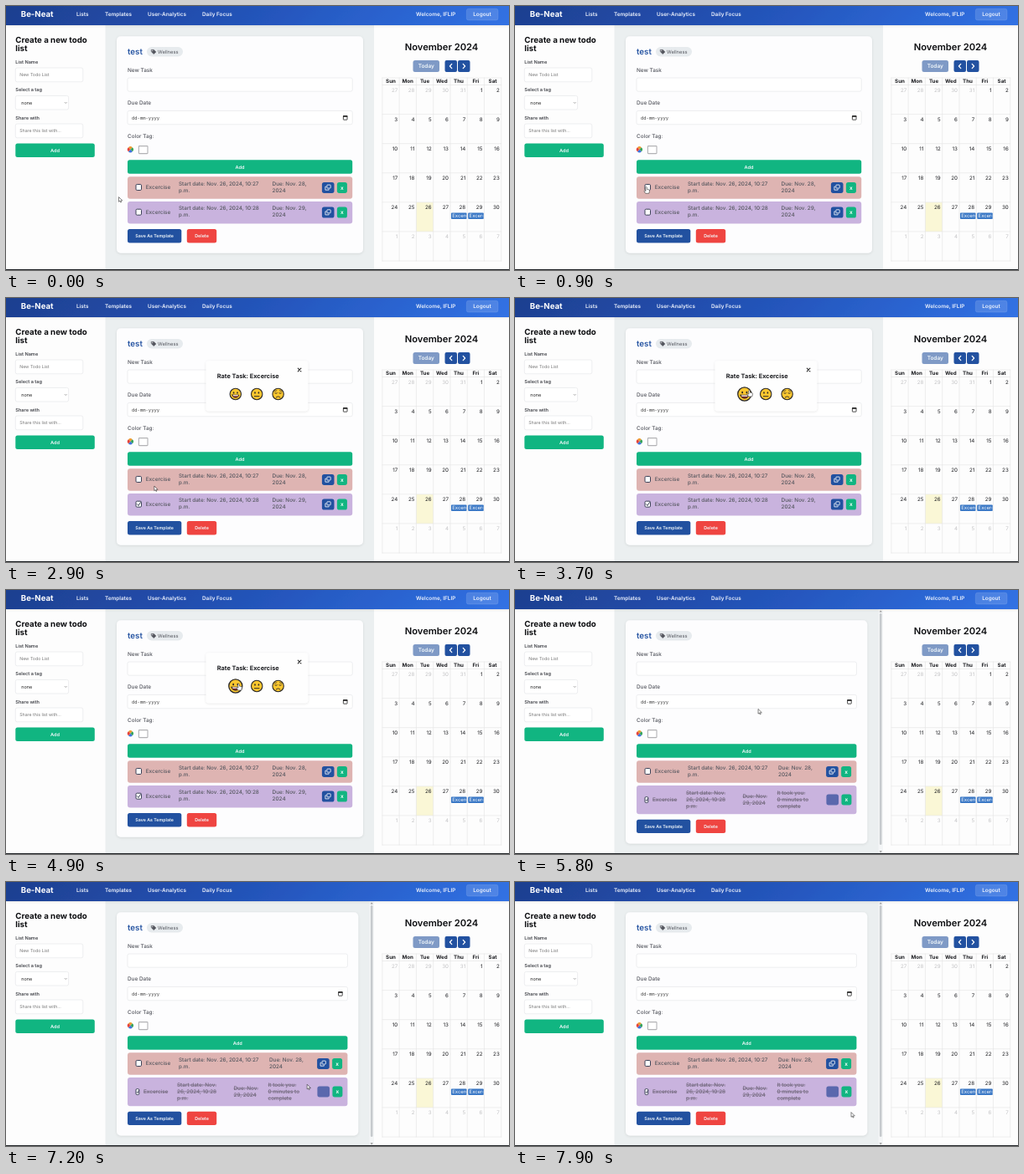
Animation, 600 px wide and 316 px high, one loop 8 s. Source, as an HTML page:

```html
<!DOCTYPE html>
<html lang="en">
<head>
<meta charset="utf-8">
<title>Todo list</title>
<style>
html, body { margin: 0; width: 100%; height: 100%; overflow: hidden; background: #fff; }
svg { display: block; width: 600px; height: 316px; }
text { font-family: Inter, sans-serif; text-rendering: geometricPrecision; white-space: pre; }
</style>
</head>
<body>
<svg id="stage" viewBox="0 0 600 316"></svg>
<script>
const LOOP = 8000, CHECKED = 2500, DONE = 5600;
const BLUE = '#2251a0', GREEN = '#11b581', GREY = '#54565e', LINE = '#e5e7ea';

const rect = (x, y, w, h, fill, r = 0, more = '') =>
  `<rect x="${x}" y="${y}" width="${w}" height="${h}" rx="${r}" fill="${fill}" ${more}/>`;
const path = (d, stroke, width = 1, fill = 'none') =>
  `<path d="${d}" stroke="${stroke}" stroke-width="${width}" fill="${fill}" stroke-linecap="round" stroke-linejoin="round"/>`;
const text = (s, x, y, size, weight = 400, fill = GREY, more = '') =>
  `<text x="${x}" y="${y}" font-size="${size}" font-weight="${weight}" fill="${fill}" ${more}>${s}</text>`;
const mid = 'text-anchor="middle"';
const lines = (list, x, y, more) =>
  list.map((s, i) => text(s, x, y + i * 7.9, 6.35, 500, more ? '#6f6679' : GREY, more)).join('');
const field = (x, y, w, h) => rect(x, y, w, h, '#fff', 2, `stroke="${LINE}" stroke-width=".7"`);
const button = (s, x, y, w, h, fill, size = 5.6) =>
  rect(x, y, w, h, fill, 2.5) + text(s, x + w / 2, y + h / 2 + size * .36, size, 600, '#f2f8fb', mid);

function header() {
  const links = [['Lists', 84], ['Templates', 118], ['User-Analytics', 169], ['Daily Focus', 234], ['Welcome, IFLIP', 489]];
  return rect(0, 0, 600, 23, 'url(#bar)', 0, 'filter="url(#soft)"') +
    text('Be-Neat', 17.8, 13.2, 9.6, 700, '#fff') +
    links.map(([s, x]) => text(s, x, 12.3, 6.4, 600, '#eef3fd')).join('') +
    rect(549.3, 3.2, 37.7, 13.8, '#fff', 2.5, 'fill-opacity=".14" stroke="#fff" stroke-opacity=".22" stroke-width=".5"') +
    text('Logout', 568, 12.3, 6.4, 600, '#eef3fd', mid);
}

function sidebar() {
  const label = (s, y) => text(s, 11.3, y, 5.6, 600, '#44464c');
  return rect(0, 23, 118.5, 293, '#fdfdfd') +
    text('Create a new todo', 11.3, 43.6, 9.7, 700, '#0d0e11') +
    text('list', 11.3, 54.4, 9.7, 700, '#0d0e11') +
    label('List Name', 69) + field(11.3, 74, 80.5, 16.8) +
    text('New Todo List', 16.2, 84.3, 5.25, 400, '#777') +
    label('Select a tag', 102.4) + field(11.3, 107.4, 63.3, 16.6) +
    text('none', 18.2, 117.7, 5.5, 400, '#222') + path('M70 115.3l1.2 1.2 1.2-1.2', '#777', .6) +
    label('Share with', 136) + field(11.3, 141, 80.5, 16.8) +
    text('Share this list with...', 16.2, 151.3, 5.25, 400, '#777') +
    button('Add', 11.3, 164.5, 94.5, 16.5, GREEN);
}

function calendar() {
  const col = i => 448.9 + i * 20.26, row = i => 94.5 + i * 35.1;
  let s = rect(439, 23, 161, 293, '#fdfdfd') +
    text('November 2024', 519.5, 52.6, 11.2, 600, '#0d0e11', mid) +
    button('Today', 485.5, 65, 31.5, 14, '#7f9ac6', 6.5) +
    rect(523.5, 65, 14.5, 14, BLUE, 2) + rect(539, 65, 14.5, 14, BLUE, 2) +
    path('M531.8 69.4l-2.4 2.6 2.4 2.6M545.2 69.4l2.4 2.6-2.4 2.6', '#fff', 1.2) +
    rect(col(2), row(4), 20.26, 35.1, '#faf7d6');
  let grid = '';
  for (let i = 0; i < 8; i++) grid += `M${col(i)} 86V${row(6)}`;
  for (let i = 0; i < 7; i++) grid += `M${col(0)} ${row(i)}H${col(7)}`;
  s += path(grid + `M${col(0)} 86H${col(7)}`, '#e3e3e3', .6);
  'Sun Mon Tue Wed Thu Fri Sat'.split(' ').forEach((d, i) => {
    s += text(d, col(i) + 10.1, 92.2, 6.2, 700, '#1a1b1f', mid);
  });
  for (let i = 0; i < 42; i++) {
    const day = new Date(2024, 9, 27 + i);
    s += text(day.getDate(), col(i % 7 + 1) - 2, row(i / 7 | 0) + 8.3, 6.2, 400,
      day.getMonth() === 10 ? '#1a1b1f' : '#c3c3c5', 'text-anchor="end"');
  }
  for (const c of [4, 5]) {
    s += rect(col(c) + 1, 247.5, 18.6, 7.5, '#3a78c6', 1) +
      `<svg x="${col(c) + 1}" y="246.6" width="18.2" height="9">${text('Excerc', 1.4, 6.6, 5.9, 400, '#fff')}</svg>`;
  }
  return s;
}

const checkbox = (x, y, w = 6.5) => rect(x, y, w, 7, '#fff', 1.3, 'stroke="#3c4258" stroke-width="1"');
const rowButtons = (x, y, faded) =>
  rect(x, y, 14.6, 13, faded ? '#5a68ad' : BLUE, 2.6) +
  (faded ? '' : rect(x + 6, y + 3.2, 4.3, 4, 'none', .6, 'stroke="#fff" stroke-width=".8"') +
    path(`M${x + 4.9} ${y + 5.3}h-.9v4h4.2v-.9`, '#fff', .8)) +
  rect(x + 18, y, 12, 13, GREEN, 2.6) + text('x', x + 24, y + 8.6, 6.4, 700, '#e9fff6', mid);

function openRow(y, fill, w, min, due, dueX) {
  return rect(145, y, w, 26.4, fill, 3) + checkbox(155, y + 9.2) +
    text('Excercise', 166.8, y + 14.6, 6.35, 500) +
    lines([`Start date: Nov. 26, 2024, 10:${min}`, 'p.m.'], 206, y + 10.3) +
    lines([`Due: Nov. ${due},`, '2024'], dueX, y + 10.3) +
    rowButtons(145 + w - 36.3, y + 6.6);
}

function doneRow(y, w) {
  const strike = 'text-decoration="line-through"';
  return rect(145, y, w, 34.2, '#c9b3de', 3) + checkbox(155, y + 13.6, 3.8) +
    path(`M156 ${y + 17.3}l1 1.3 1.5-3.2`, '#3c4258', .8) +
    lines(['Excercise'], 164, y + 19, strike) +
    lines(['Start date: Nov.', '26, 2024, 10:28', 'p.m.'], 204, y + 11, strike) +
    lines(['Due: Nov.', '29, 2024'], 271.5, y + 15, strike) +
    lines(['It took you:', '0 minutes to', 'complete'], 312.5, y + 11, strike) +
    rowButtons(145 + w - 36, y + 10.4, true);
}

function card(done) {
  const w = done ? 262.4 : 268.2, end = 145 + w, drop = done ? 7.7 : 0;
  const wheel = ['#ee9a2e', '#35a35a', '#3f73dd', '#e5433a'].map((c, i) =>
    `<path d="M0 0V-3.5A3.5 3.5 0 0 1 3.5 0Z" fill="${c}" transform="translate(148.4 171.8) rotate(${i * 90 - 45})"/>`).join('');
  return rect(132, 36.3, w + 25.8, 259.4 + drop, '#fdfdfe', 5, 'filter="url(#soft)"') +
    text('test', 145, 58, 9.7, 600, BLUE) +
    rect(168, 49, 43, 11.4, '#e7ebee', 5.7) +
    path('M173.6 52.4h2.8l2.5 2.5-2.6 2.6-2.7-2.6z', GREY, .6, GREY) +
    `<circle cx="174.8" cy="53.6" r=".55" fill="#fff"/>` +
    text('Wellness', 181, 57, 5.8) +
    text('New Task', 145, 78.8, 6.4, 500) + field(145, 86, w, 16.2) +
    text('Due Date', 145, 118, 6.4, 500) + field(145, 125.4, w, 16.4) +
    text('dd-mm-yyyy', 150, 135.7, 5.5, 400, '#444', 'style="font-family:\'DejaVu Sans Mono\',monospace"') +
    rect(end - 10.8, 131.6, 4.6, 4.6, 'none', .4, 'stroke="#222" stroke-width=".8"') +
    rect(end - 11.1, 131.2, 5.2, 1.6, '#222') +
    text('Color Tag:', 145, 158, 6.4, 500) + wheel +
    rect(158.4, 167.6, 10.6, 9, '#fff', .6, 'stroke="#b2b2b5" stroke-width="1.1"') +
    button('Add', 145, 184.3, w, 16.5, GREEN) +
    openRow(204.3, '#deb4b2', w, 27, 28, done ? 314 : 317.6) +
    (done ? doneRow(234, w) : openRow(234, '#c9b3de', w, 28, 29, 317.6)) +
    button('Save As Template', 145, 267 + drop, 64.3, 16.4, BLUE, 5.3) +
    button('Delete', 215.8, 267 + drop, 35.4, 16.4, '#ef4541', 5.4) +
    (done ? rect(433.6, 23, 5.4, 293, '#f4f6f7') + rect(434.9, 28, 2.6, 277, '#c6cacd', 1.3) +
      path('M435.3 26.2h2l-1-1.3zM435.3 312.6h2l-1 1.3z', '#888', .4, '#888') : '');
}

const face = (id, x, features) =>
  `<g id="${id}" transform="translate(${x} 115)"><circle r="6.7" fill="#fcc72f" stroke="#2c2a28" stroke-width="1.1"/>${features}</g>`;
const eyes = `<ellipse cx="-2.2" cy="-1.6" rx=".8" ry="1.2" fill="#2c2a28"/><ellipse cx="2.2" cy="-1.6" rx=".8" ry="1.2" fill="#2c2a28"/>`;

function modal() {
  return rect(238.6, 75.3, 121.6, 60, '#fefefe', 3, 'filter="url(#soft)"') +
    text('Rate Task: Excercise', 251.8, 95.6, 7.35, 700, '#1c1d21') +
    path('M348.3 84.2l3.6 3.6M351.9 84.2l-3.6 3.6', '#333', 1.2) +
    face('grin', 273.8, eyes + path('M-4 1H4C3.6 5.4-3.6 5.4-4 1Z', '#2c2a28', .7, '#7d2a22') + rect(-3, 1.2, 6, 1.1, '#fff')) +
    face('flat', 299.2, eyes + path('M-2.8 2.7H2.8', '#2c2a28', 1)) +
    face('sad', 324.6, path('M-3.8-1.2q1.5 1.2 2.6 0M3.8-1.2q-1.5 1.2-2.6 0M-2.4 3.8Q0 1.6 2.4 3.8', '#2c2a28', .9) +
      path('M-4-3.4l2.2-.8M4-3.4l-2.2-.8', '#2c2a28', .7));
}

// The header gradient runs at 135 degrees.
stage.innerHTML = `<defs>
  <linearGradient id="bar" gradientUnits="userSpaceOnUse" x1="144" y1="-144" x2="456" y2="167"><stop stop-color="#1e3f8f"/><stop offset=".5" stop-color="#2454ba"/><stop offset="1" stop-color="#3172e4"/></linearGradient>
  <filter id="soft" x="-10%" y="-15%" width="120%" height="135%"><feDropShadow dx="0" dy=".8" stdDeviation="1.4" flood-opacity=".11"/></filter>
</defs>` + rect(0, 0, 600, 316, '#ebeff0') + sidebar() + calendar() +
  `<g id="open">${card(false)}</g><g id="done">${card(true)}</g>` + header() +
  rect(0, 315, 600, 1, '#24272b') +
  `<g id="tick">${path('M156.5 246.8l1.5 1.7 2.4-3.9', '#3c4258', 1)}</g><g id="modal">${modal()}</g>` +
  `<g id="arrow">${path('M0 0V5.3L1.3 4.2 2.2 6.1 3.1 5.7 2.3 3.9H3.9Z', '#333', .6, '#fff')}</g>` +
  `<g id="hand">${path('M-.8 .7Q0-.4 .8 .7V3L3.6 3.7Q4.2 4.1 4 5.2L3.3 8H-.8L-2.6 5.2Q-2.4 4.2-.8 5Z', '#333', .6, '#fff')}</g>`;

const $ = id => document.getElementById(id);
const show = (id, on) => $(id).style.display = on ? '' : 'none';
// time, x, y of the pointer tip
const route = [[0, 134.5, 229], [350, 134.5, 229], [850, 156.5, 216.3], [1350, 156.5, 216.3], [1950, 157.6, 247],
  [2700, 157.6, 247], [3500, 279.5, 110], [4100, 279.5, 110], [4700, 277.5, 112], [5500, 277.5, 112],
  [6300, 317, 209], [6800, 317, 209], [7600, 401, 276], [LOOP, 401, 276]];

function pointer(t) {
  const i = route.findIndex(p => p[0] > t), [t0, x0, y0] = route[i - 1], [t1, x1, y1] = route[i];
  const u = (t - t0) / (t1 - t0), k = u * u * (3 - 2 * u);
  return [x0 + (x1 - x0) * k, y0 + (y1 - y0) * k];
}

function draw(now) {
  const t = now % LOOP, [x, y] = pointer(t);
  const rating = t >= CHECKED && t < DONE;
  const onFace = rating && Math.hypot(x - 273.8, y - 115) < 9;
  const onBox = x > 153 && x < 163 && (Math.abs(y - 217) < 5 || Math.abs(y - 247) < 5);
  show('open', t < DONE);
  show('done', t >= DONE);
  show('tick', rating);
  show('modal', rating);
  $('grin').setAttribute('transform', `translate(273.8 115) scale(${onFace ? 1.2 : 1})`);
  show('hand', onFace || onBox);
  show('arrow', !onFace && !onBox);
  for (const id of ['hand', 'arrow']) $(id).setAttribute('transform', `translate(${x} ${y})`);
  requestAnimationFrame(draw);
}
requestAnimationFrame(draw);
</script>
</body>
</html>
```
